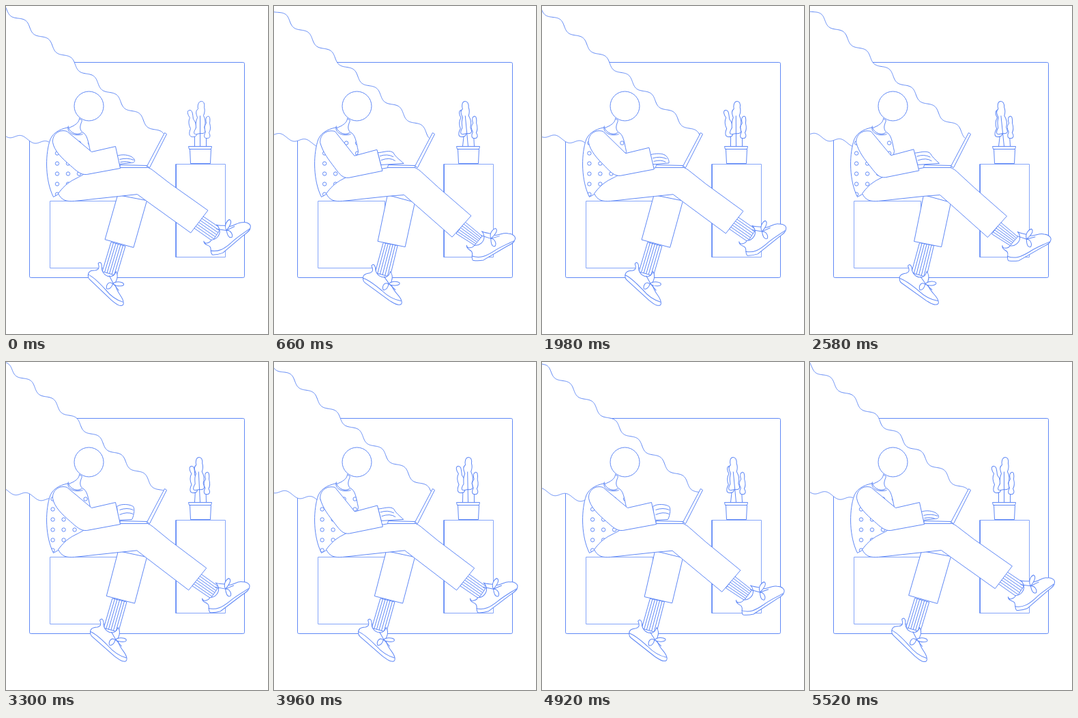
An HTML page with a canvas for the animation above (5580 ms loop, 384 px wide and 480 px high).

```html
<!DOCTYPE html>
<html lang="en">
<head>
<meta charset="utf-8">
<title>Working with a laptop</title>
<style>
html, body { margin: 0; width: 100%; height: 100%; overflow: hidden; background: #fff; }
canvas { display: block; }
</style>
</head>
<body>
<canvas id="stage" width="384" height="480"></canvas>
<script>
const ctx = document.getElementById('stage').getContext('2d');
const LOOP = 5580, CYCLE = 1860, STEP = 60, TAU = Math.PI * 2;
const BLUE = '#5f88f6', PALE = '#86a6f9';

const lerp = (a, b, k) => a + (b - a) * k;
const swing = x => (1 - Math.cos(TAU * x)) / 2;
const ease = (a, b, x) => {
  const k = Math.min(1, Math.max(0, (x - a) / (b - a)));
  return k * k * (3 - 2 * k);
};

// Blend two path strings that have the same commands
function mix(from, to, k) {
  const ends = to.match(/-?[\d.]+/g);
  let i = 0;
  return from.replace(/-?[\d.]+/g, v => lerp(+v, +ends[i++], k).toFixed(2));
}

function shape(d, color = BLUE) {
  const p = new Path2D(d);
  ctx.strokeStyle = color;
  ctx.fill(p);
  ctx.stroke(p);
  ctx.strokeStyle = BLUE;
}
const line = d => ctx.stroke(new Path2D(d));

function circle(x, y, r) {
  ctx.beginPath();
  ctx.arc(x, y, r, 0, TAU);
  ctx.fill();
  ctx.stroke();
}

function group(matrix, draw) {
  ctx.save();
  ctx.transform(...matrix);
  draw();
  ctx.restore();
}

// Move a shape from one anchor to another and turn it by an angle in degrees
function placed(x, y, toX, toY, deg, draw) {
  const a = deg * Math.PI / 180, c = Math.cos(a), s = Math.sin(a);
  group([c, s, -s, c, toX - c * x + s * y, toY - s * x - c * y], draw);
}

function smoke(p) {
  const upper = [], lower = [];
  for (let u = -14; u < 300; u++) {
    const wave = 4 * Math.sin(TAU * ((u - 22.7) / 43 + p));
    const bx = u * 0.775, x = bx + wave * 0.633;
    const y = 2.6 + u * 0.633 - wave * 0.775 + 2.5 * Math.exp(-Math.max(0, bx) / 12);
    if (x + 0.52 * (y - 185) > 232) break;
    upper.push([x, y]);
  }
  for (let x = 63; x >= -3; x--)
    lower.push([x, 187.8 + 0.22 * x - 3.5 * Math.cos(TAU * ((x - 22) / 37 + p))]);
  const path = pts => 'M' + pts.map(q => q.map(v => v.toFixed(2)).join()).join('L');
  ctx.fill(new Path2D(path([...upper, [207, 235], ...lower]) + 'Z'));
  line(path(upper));
  line(path(lower));
}

function plant(k) {
  const sway = (dx, draw) => group([1, 0, -dx * k / 66, 1, dx * k * 205 / 66, 0], draw);
  sway(8, () => {
    line('M276 188V206');
    shape('M268 152C264 153 266 159 269 163C266 169 268 175 270 179C267 186 268 191 273 191C280 191 280 187 277 181C279 176 278 170 274 165C273 158 273 151 268 152Z');
  });
  sway(-4, () => {
    line('M293 190V206');
    shape('M295 161C292 162 292 167 293 171C289 176 291 182 292 184C289 189 290 193 293 193C298 194 300 190 297 185C300 180 299 175 298 171C299 164 298 160 295 161Z');
  });
  sway(-7, () => {
    shape('M286 139C281 139 280 146 281 150C276 154 279 159 280 163C277 169 278 174 278 178C274 184 274 188 279 187L284 186C292 187 292 183 290 177C293 170 291 164 289 160C291 155 291 151 290 148C291 142 289 139 286 139Z');
    line('M284 160L284 206');
  });
  shape('M269 209L270 230H299L300 209Z');
  shape('M267 205H301L300 209H268Z');
}

// Quad given as near edge (a, b) and far edge (c, d), striped from one to the other
function sock(from, to, k) {
  const [ax, ay, bx, by, cx, cy, dx, dy] = from.map((v, i) => lerp(v, to[i], k));
  shape(`M${ax} ${ay}L${bx} ${by}L${cx} ${cy}L${dx} ${dy}Z`);
  for (let i = 1; i < 6; i++) {
    const q = i / 6;
    line(`M${lerp(ax, bx, q)} ${lerp(ay, by, q)}L${lerp(dx, cx, q)} ${lerp(dy, cy, q)}`);
  }
}

function standingLeg(k) {
  sock([153, 345, 174, 351, 161, 394, 140, 388], [160, 346, 181, 350, 170, 396, 148, 390], k);
  placed(119, 396, lerp(119, 131, k), lerp(396, 402, k), -8.5 * k, () => {
    shape('M119 394C119 388 122 386 130 386C135 385 136 382 134 376C137 372 140 376 139 383C140 391 146 396 153 395C157 394 159 391 160 388C163 393 162 398 160 402C157 407 160 414 166 423C172 432 172 439 166 438C162 438 158 434 153 430L121 399Q119 397 119 394Z');
    line('M119 392C126 395 135 404 144 414C151 423 160 430 170 433');
    shape('M155 406C159 402 168 403 171 406C173 410 162 411 155 406Z');
    shape('M155 406C149 401 145 408 146 413C150 415 154 410 155 406Z');
    line('M150 394L156 406L164 416');
  });
  shape(mix('M163 276L144 341L186 353L206 284Z', 'M166 276L152 344L192 352L206 287Z', k));
}

function crossedLeg(k) {
  sock([288, 306, 276, 324, 303, 343, 315, 324], [279, 316, 266, 333, 293, 350, 304, 337], k);
  placed(290, 343, lerp(290, 281.5, k), lerp(343, 350, k), 11 * k, () => {
    shape('M290 343C291 349 300 345 301 341C309 341 314 333 313 327C312 323 310 320 308 319C314 321 322 319 328 321C335 320 340 314 347 315C354 314 359 318 358 322C358 327 353 330 348 334L318 360Q310 363 303 363C299 360 302 354 299 351C296 348 290 349 290 343Z');
    line('M300 357C312 359 320 354 330 345C339 336 348 331 357 324');
    shape('M323 327C319 320 323 313 327 311C332 313 328 321 323 327Z');
    shape('M323 327C329 326 333 333 331 337C326 339 324 332 323 327Z');
    line('M308 325L323 327L335 321');
  });
  shape(mix(
    'M76 274C81 284 88 286 100 285L165 278L192 275L206 285L271 331L296 298L240 259L215 240Q208 234 196 234L167 236L113 246C100 254 90 255 76 274Z',
    'M76 274C81 284 88 286 100 285L165 278L190 276L206 290L260 338L288 307L240 265L215 242Q208 235 196 234L167 236L113 246C100 254 90 255 76 274Z', k));
}

function torso(u) {
  shape('M107 164C107 170 100 175 91 178C94 188 108 189 111 184C106 178 109 173 111 167Z');
  circle(121, 146, 21.5);
  const vest = new Path2D('M91 177C77 180 66 186 63 199C57 220 57 255 69 279L76 275C84 263 92 258 104 256L116 246L123 212C120 199 119 187 111 184C107 190 93 186 91 177Z');
  ctx.fill(vest);
  ctx.save();
  ctx.clip(vest);
  const x0 = 71 + 3.5 * Math.cos(TAU * u);
  for (let row = 0; row < 6; row++)
    for (let col = 0; col < 4; col++) circle(x0 + col * 16, 200 + row * 15, 2.7);
  ctx.restore();
  ctx.stroke(vest);
  line('M91 175C87 185 101 191 112 187');
}

function typing(a, h) {
  shape('M167 232L207 233L206 236H166Z');
  shape('M232 185L235 187L210 236L206 234Z');
  const low = 'M162 219C169 216 181 217 186 222C190 226 188 229 183 229L164 231Z';
  const high = 'M162 211C169 206 182 208 186 211C189 215 186 227 184 230L164 231Z';
  const reach = 'M151 214C158 214 169 209 174 214C177 220 182 223 190 230L156 232Z';
  shape(mix(mix(low, high, h), reach, a));
  line(mix(mix('M166 224Q177 221 187 225', 'M166 216Q177 212 186 216', h), 'M154 219Q165 215 174 220', a));
  line(mix(mix('M167 228Q177 226 183 229', 'M166 223Q177 218 186 222', h), 'M156 225Q169 220 177 226', a));
  shape(mix(
    'M89 183C77 179 67 188 68 199C70 211 81 222 94 233C103 241 109 247 118 246L167 237L160 205L125 213Z',
    'M89 183C77 180 67 187 67 199C71 214 80 225 88 236C96 247 100 252 109 251L158 241L150 210L117 219Z', a));
}

function draw(now) {
  const t = Math.floor(now % LOOP / STEP) * STEP;
  const p = t % CYCLE / CYCLE;
  // Legs swing between a sine and a steady back and forth
  const q = (p + 0.05) % 1;
  const k = 1.1 * lerp(swing(q), 1 - Math.abs(1 - 2 * q), 0.5);
  const reach = ease(0, 0.16, p) * (1 - ease(0.32, 0.6, p));
  const lift = ease(0.45, 0.6, p) * (1 - ease(0.78, 0.95, p));

  ctx.setTransform(1, 0, 0, 1, 0, 0);
  ctx.fillStyle = '#fff';
  ctx.fillRect(0, 0, 384, 480);
  ctx.translate(0.5, 0.5);
  ctx.strokeStyle = BLUE;
  ctx.lineWidth = 1;
  ctx.lineJoin = 'round';

  shape('M36 82H347Q349 82 349 84V395Q349 397 347 397H36Q34 397 34 395V84Q34 82 36 82Z');
  smoke(p);
  shape('M248 231H321V367H248Z', PALE);
  line('M249 231V367');
  plant(1.1 * swing(p));
  shape('M64 285H162V383H64Z', PALE);
  standingLeg(k);
  torso(t / LOOP);
  crossedLeg(k);
  typing(reach, lift);
}

const start = performance.now();
function frame() {
  draw(performance.now() - start);
  requestAnimationFrame(frame);
}
frame();
</script>
</body>
</html>
```
